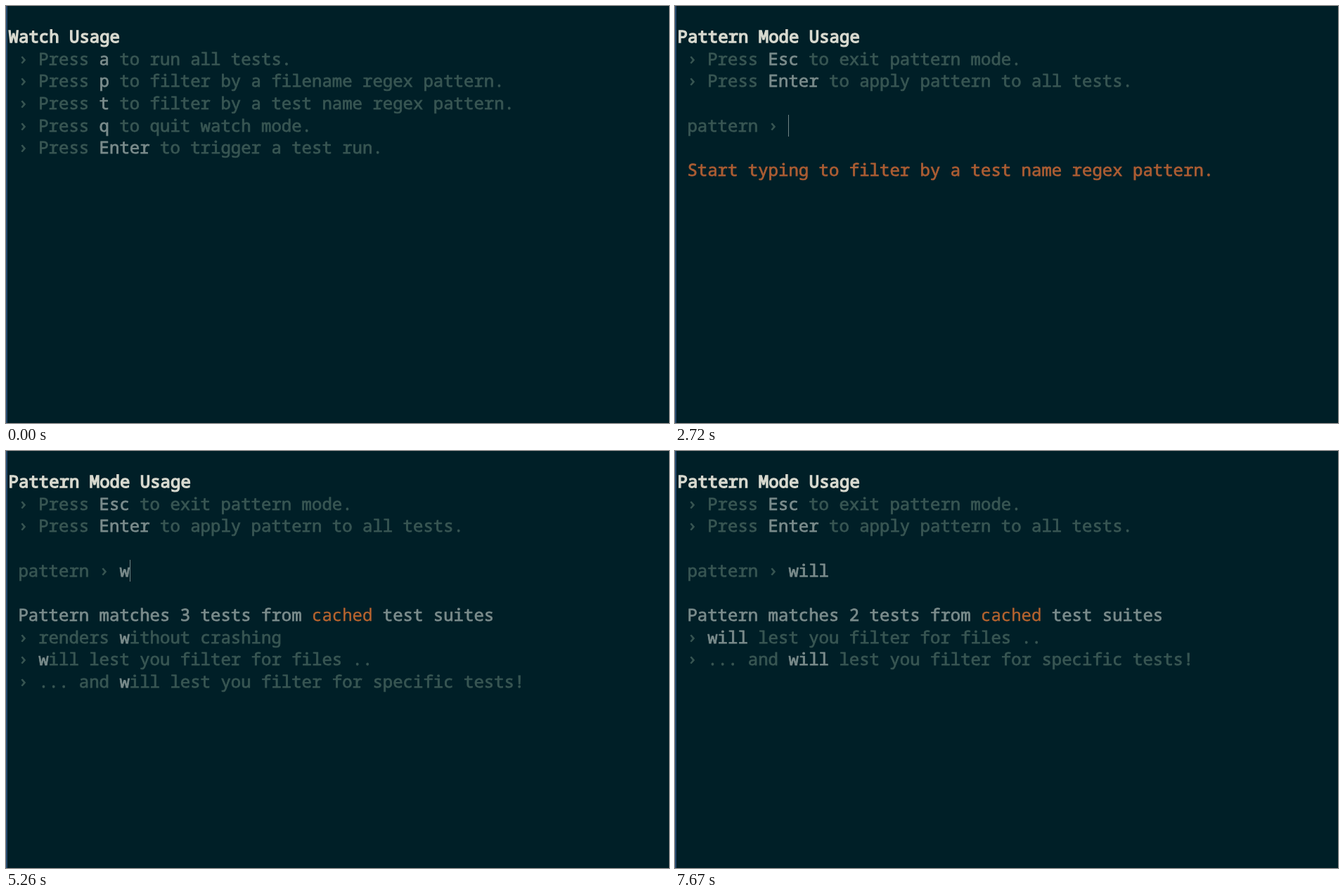
An HTML page for the animation above (8 s loop, 943 px wide and 594 px high).

```html
<!DOCTYPE html>
<html lang="en">
<head>
<meta charset="utf-8">
<title>Watch mode</title>
<style>
  html, body { margin: 0; width: 100%; height: 100%; overflow: hidden; background: #001f27; }
  svg { display: block; width: 943px; height: 594px; }
  /* A thin stroke in the text colour gives a weight between regular and bold */
  text {
    font: 400 24px "Noto Sans Mono", "DejaVu Sans Mono", monospace;
    white-space: pre;
    text-rendering: geometricPrecision;
    color: #385653;
    fill: currentColor;
    stroke: currentColor;
    stroke-width: 0.75px;
  }
  tspan { fill: currentColor; stroke: currentColor; }
  .head { color: #d8d9cf; stroke-width: 1.4px; }
  .key { color: #7b8c8c; }
  .warn { color: #ac5d33; }
  .cached { color: #b7642f; stroke-width: 0.35px; }
  #edge { fill: #264a6e; }
  #caret { fill: #718485; }
</style>
</head>
<body>
<svg viewBox="0 0 943 594">
  <rect width="943" height="594" fill="#001f27"/>
  <rect id="edge" width="2" height="594"/>
  <g id="screen"></g>
  <rect id="caret" width="1"/>
</svg>
<script>
const LOOP = 8000, LEFT = 3, CELL = 14.4, ROW = 31.68, BASE = 52;
const screen = document.getElementById('screen');
const caret = document.getElementById('caret');

const span = (cls, s) => `<tspan class="${cls}">${s}</tspan>`;
const title = s => `<tspan class="head" dx="0.6">${s}</tspan>`;
const key = s => span('key', s);
const press = (k, rest) => ` › Press ${key(k)} to ${rest}.`;
const baseline = row => Math.round(BASE + ROW * (row - 1));

const usage = [
  title('Watch Usage'),
  press('a', 'run all tests'),
  press('p', 'filter by a filename regex pattern'),
  press('t', 'filter by a test name regex pattern'),
  press('q', 'quit watch mode'),
  press('Enter', 'trigger a test run')
];

const tests = [
  'renders without crashing',
  'will lest you filter for files ..',
  '... and will lest you filter for specific tests!'
];

function results(typed) {
  if (!typed) return [span('warn', ' Start typing to filter by a test name regex pattern.')];
  const found = tests.filter(t => t.includes(typed));
  return [
    key(` Pattern matches ${found.length} tests from `) + span('cached', 'cached') + key(' test suites'),
    ...found.map(t => ' › ' + t.replace(typed, key(typed)))
  ];
}

const pattern = typed => [
  title('Pattern Mode Usage'),
  press('Esc', 'exit pattern mode'),
  press('Enter', 'apply pattern to all tests'),
  '',
  ' pattern › ' + key(typed),
  '',
  ...results(typed)
];

// Start time, lines, caret column and row, times at which the caret toggles
const prompt = (at, typed, toggles) =>
  ({ at, lines: pattern(typed), col: 11 + typed.length, row: 5, shown: true, toggles });
const scenes = [
  { at: 0, lines: usage, col: 0, row: 7, shown: false, toggles: [570, 1160, 1760, 2360] },
  prompt(2720, '', [3290, 3890, 4490, 5090]),
  prompt(5260, 'w', []),
  prompt(5680, 'wi', [6240]),
  prompt(6700, 'wil', []),
  prompt(7110, 'will', [7670])
];

let current;

function show(scene) {
  current = scene;
  screen.innerHTML = scene.lines
    .map((s, i) => `<text x="${LEFT}" y="${baseline(i + 1)}" xml:space="preserve">${s}</text>`)
    .join('');
  caret.setAttribute('x', Math.floor(LEFT + 0.2 + scene.col * CELL));
  caret.setAttribute('y', baseline(scene.row) - 24);
  caret.setAttribute('height', scene.row === 7 ? 32 : 31);
}

function draw(now) {
  const t = now % LOOP;
  const scene = scenes.filter(s => s.at <= t).pop();
  if (scene !== current) show(scene);
  const flips = scene.toggles.filter(x => x <= t).length;
  const visible = scene.shown === (flips % 2 === 0);
  caret.setAttribute('visibility', visible ? 'visible' : 'hidden');
}

const start = performance.now();
function tick() {
  draw(performance.now() - start);
  requestAnimationFrame(tick);
}
tick();
</script>
</body>
</html>
```
